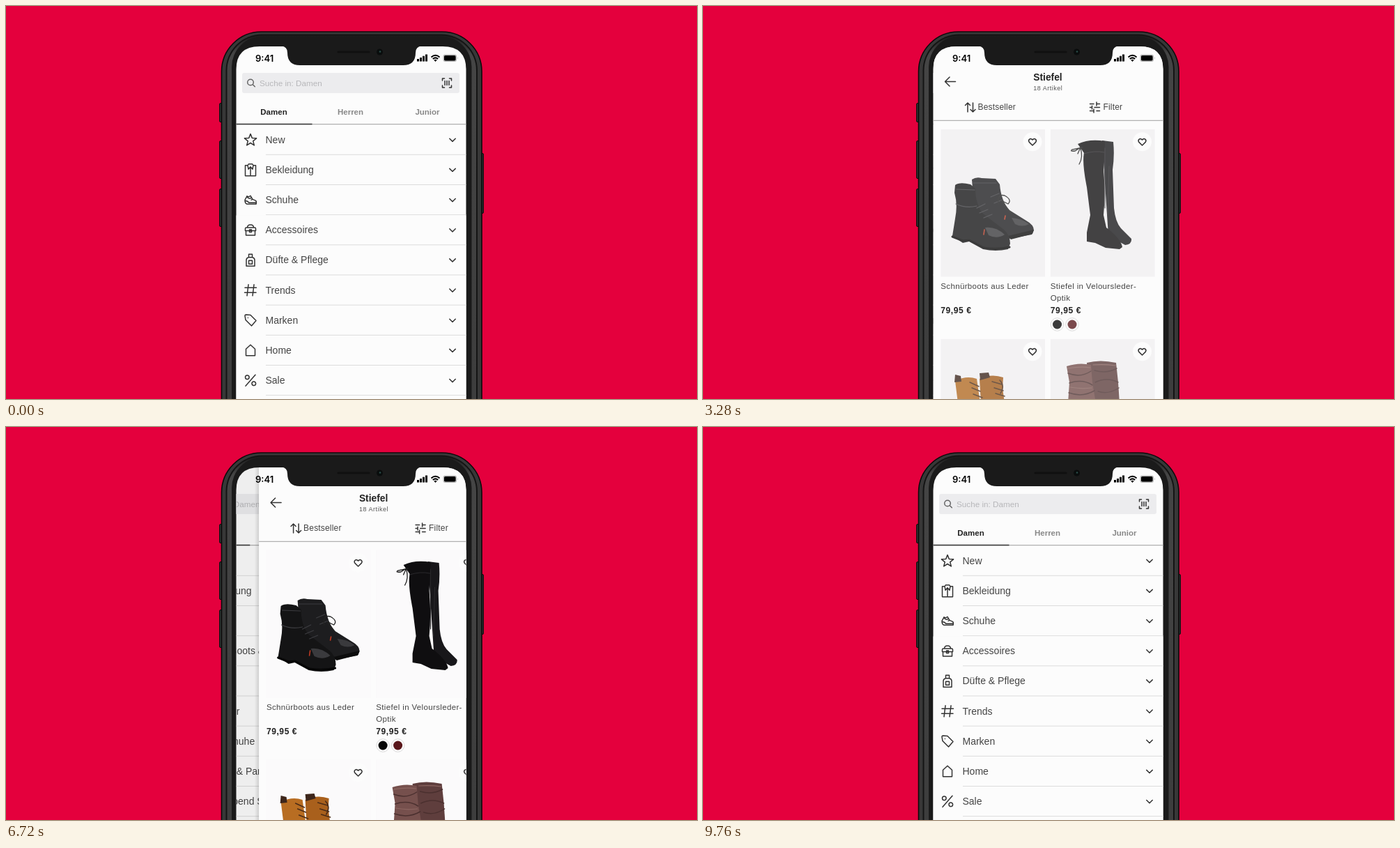
These frames come from a looping animation (992 px wide and 564 px high, 9.84 s). An HTML page:

```html
<!DOCTYPE html>
<html lang="de">
<head>
<meta charset="utf-8">
<title>Shop-App</title>
<style>
html, body { margin: 0; width: 100%; height: 100%; overflow: hidden; background: #e4003d; }
svg { display: block; width: 992px; height: 564px; font-family: "Liberation Sans", Arial, sans-serif; }
.line { fill: none; stroke: #333; stroke-width: 1.5; stroke-linejoin: round; stroke-linecap: round; }
.row { font-size: 14px; fill: #444; }
.tab { font: bold 11.5px "Liberation Sans", Arial, sans-serif; text-anchor: middle; fill: #888; }
.tool { font-size: 12px; letter-spacing: .18px; fill: #444; }
.name { font-size: 11.5px; letter-spacing: .35px; fill: #444; }
.price { font-size: 12px; font-weight: bold; letter-spacing: .6px; fill: #222; }
</style>
</head>
<body>
<svg viewBox="0 0 992 564">
  <defs>
    <clipPath id="glass"><path d="M330.500 564V91Q330.500 58 364 58H627Q660.500 58 660.500 91V564z"/></clipPath>
    <linearGradient id="edge"><stop offset="0" stop-opacity="0"/><stop offset="1" stop-opacity=".14"/></linearGradient>
    <linearGradient id="rim" x2="0" y2="1"><stop offset="0" stop-color="#1c1c1c"/><stop offset=".04" stop-color="#454545"/><stop offset="1" stop-color="#3b3b3b"/></linearGradient>
  </defs>
  <rect width="992" height="564" fill="#e4003d"/>
  <g fill="#303030" stroke="#0c0c0c">
    <rect x="306.500" y="139.500" width="6" height="27" rx="1.500"/>
    <rect x="306.500" y="193.500" width="6" height="54" rx="1.500"/>
    <rect x="306.500" y="262.500" width="6" height="54" rx="1.500"/>
    <rect x="680" y="211.500" width="5.500" height="86" rx="1.500"/>
  </g>
  <rect x="309.500" y="37" width="373.500" height="640" rx="57" fill="#383838" stroke="#0b0b0b" stroke-width="1.600"/>
  <rect x="315.500" y="40.500" width="361.500" height="640" rx="52" fill="#141414"/>
  <rect x="317.500" y="42.500" width="357.500" height="640" rx="50" fill="url(#rim)"/>
  <rect x="324" y="43.500" width="344.500" height="640" rx="44" fill="#1a1a1a"/>
  <g clip-path="url(#glass)">
    <rect x="330" y="57" width="331" height="508" fill="#fcfcfc"/>
    <g id="menu"></g>
    <rect id="dim" x="330" y="57" width="331" height="508"/>
    <g id="shop"></g>
    <text x="358" y="79.500" font-size="13" font-weight="600" style="font-family:Inter,sans-serif">9:41</text>
    <path d="M590 76h3v3.500h-3zM594 74h3v5.500h-3zM598 71.800h3v7.700h-3zM602 69.500h3v10h-3z"/>
    <g fill="none" stroke="#000" stroke-width="2"><path d="M610.500 73.500q6-5.500 12 0M612.800 76q3.700-3.200 7.400 0"/></g>
    <path d="M616.500 80l-2.200-2.400q2.200-1.700 4.400 0z"/>
    <rect x="627.500" y="69.500" width="19.500" height="10.500" rx="3" fill="#bbb"/>
    <rect x="629" y="71" width="16.500" height="7.500" rx="1.800"/>
    <path d="M648 73q1.500 1.700 0 3.500z" fill="#aaa"/>
  </g>
  <path d="M395 57.500Q404 58 404 67Q404 85 422 85H570Q588 85 588 67Q588 58 597 57.500z" fill="#1a1a1a"/>
  <path d="M477 66H521" stroke="#101010" stroke-width="3" stroke-linecap="round"/>
  <circle cx="536.500" cy="66" r="4.500" fill="#0a0d0d"/>
  <circle cx="537" cy="65.500" r="1.300" fill="#2a4d48"/>
</svg>
<script>
const LOOP = 9840, STEP = 80, PITCH = 43.17, WIDTH = 330, SUB_HEIGHT = PITCH * 8;
const $ = id => document.getElementById(id);
const rowY = i => 192 + PITCH * i;
const line = (d, x = 0, y = 0, more = '') => `<path class="line" d="${d}" transform="translate(${x} ${y})" ${more}/>`;
const text = (cls, x, y, s, more = '') => `<text class="${cls}" x="${x}" y="${y}" ${more}>${s}</text>`;
const shape = (fill, d) => `<path fill="${fill}" d="${d}"/>`;
const stroke = (color, width, d) => `<path fill="none" stroke="${color}" stroke-width="${width}" stroke-linecap="round" d="${d}"/>`;

const star = 'M' + Array.from({ length: 10 }, (_, i) => {
  const a = Math.PI * (i / 5 - .5), r = i % 2 ? 3.9 : 9;
  return `${(r * Math.cos(a)).toFixed(1)} ${(r * Math.sin(a) + .6).toFixed(1)}`;
}).join('L') + 'z';

const categories = [
  ['New', star],
  ['Bekleidung', 'M-4-6.500H-7.500V8.500H7.500V-6.500H4M-4-6.500L-2.500-8.500H2.500L4-6.500L3-1L0-4.500L-3-1zM0-4.500V8.500'],
  ['Schuhe', 'M-8 0L-5-5.500L-2.500-4.500L0-6L3-1L7.500 1Q9 2.500 8 6H-5Q-8 5.500-8 0zM-8 1Q-4 1.500-2 4H8M-1-2L1-3M1 0L3-1M-5-5.500Q-4-2-1-2'],
  ['Accessoires', 'M-4.500-3.500Q-4.500-7.500 0-7.500T4.500-3.500M-6-3.500H6Q7.500-3.500 7.500-2V1H-7.500V-2Q-7.500-3.500-6-3.500zM-6.500 1V7.500H6.500V1M-1.500-.5H1.500V3H-1.500z'],
  ['Düfte &amp; Pflege', 'M-2.500-4V-8.500H2.500V-4M-3-4H3Q6-3 6 0V8.500H-6V0Q-6-3-3-4zM-2.500 .5H2.500V5.500H-2.500z'],
  ['Trends', 'M-3-8L-5 8M5-8L3 8M-8-3.500H8.500M-8.500 3.500H8'],
  ['Marken', 'M-8-6.500Q-8-8-6.500-8L0-7.500L8 0.500L1.500 8L-7-.5zM-3.600-3.500v.1'],
  ['Home', 'M-6.500 7.500V-2L0-8L6.500-2V7.500z'],
  ['Sale', 'M7-8L-7 8M-7.500-4.500a2.800 2.800 0 1 0 5.600 0a2.800 2.800 0 1 0-5.600 0M2 4.500a2.800 2.800 0 1 0 5.600 0a2.800 2.800 0 1 0-5.600 0'],
];
const shoeTypes = ['Ankle Boots &amp; Stiefeletten', 'Stiefel', 'Sneaker', 'Halbschuhe', 'Pumps &amp; Party-Schuhe', 'Linie Abend Schuhe'];

const row = (i, label) => text('row', 372.5, rowY(i) + 4.8, label) +
  `<path d="M373 ${rowY(i) + 21.3}H661" stroke="#dcdcdc"/>`;
const category = ([label, icon], i) => row(i, label) + line(icon, 351, rowY(i)) +
  `<g transform="translate(641 ${rowY(i) + .3})"><path class="line" ${i === 2 ? 'id="toggle"' : ''} d="M-4.200-2.100L0 2.100L4.200-2.100"/></g>`;
const rows = categories.map(category);

$('menu').innerHTML = `
  <rect x="339" y="96" width="312" height="29" rx="3" fill="#ececee"/>
  <circle class="line" cx="351" cy="109.500" r="4.300" style="stroke:#666"/>
  ${line('M354.300 112.800L357.300 115.800', 0, 0, 'style="stroke:#666"')}
  ${text('', 364, 114.5, 'Suche in: Damen', 'font-size="11.700" fill="#b7b7ba"')}
  ${line('M-6.500-3.500V-6.500H-3.500M3.500-6.500H6.500V-3.500M6.500 3.500V6.500H3.500M-3.500 6.500H-6.500V3.500M-3-3V3M0-3V3M3-3V3', 633, 110.5)}
  ${text('tab', 384.5, 155.5, 'Damen', 'style="fill:#222"')}
  ${text('tab', 494.5, 155.5, 'Herren')}${text('tab', 605, 155.5, 'Junior')}
  <path d="M330 169.700H661" stroke="#b0b0b0" stroke-width="1.200"/>
  <path d="M330 169.500H439.500" stroke="#333" stroke-width="1.700"/>
  ${rows.slice(0, 3).join('')}
  ${shoeTypes.map((s, i) => row(i + 3, s) + line('M-2-4L2 0L-2 4', 641.5, rowY(i + 3))).join('')}
  <g id="rest"><rect x="330" y="300.500" width="331" height="300" fill="#fcfcfc"/>${rows.slice(3).join('')}</g>`;

const ankleBoots =
  shape('#1d1d1f', 'M386 249Q392 245 400 247L420 248L426 256Q428 280 440 293L464 308Q475 314 475 322L472 328L440 334Q425 330 415 320L390 300z') +
  shape('#0c0c0c', 'M438 330L475 321L473 327L442 335z') +
  shape('#141415', 'M362 257Q368 252 384 256L391 262Q391 285 402 298L432 321Q441 329 441 341L438 349Q420 353 402 349L382 338L373 340L358 330L362 305Q366 285 361 268z') +
  shape('#3a3a3d', 'M405 318Q420 316 433 328Q422 335 410 329zM443 304Q458 305 468 313Q458 318 448 313z') +
  stroke('#050505', 3, 'M358 331L373 337L382 336L403 347Q422 350 440 346') +
  stroke('#3c3c40', 1.2, 'M388 254H421M364 263L390 264M363 284Q378 291 393 287M393 290L405 284M397 297L409 292M403 304L415 299M413 274L425 269M418 283L430 278') +
  stroke('#222', 1.3, 'M424 284Q422 269 433 272Q444 278 438 284L428 279L442 297') +
  stroke('#c23a22', 1.6, 'M404 321L403 328M434 301L433 306');
const tallBoots =
  shape('#18171a', 'M573 193L589 195Q591 215 588 235L590 290Q592 310 600 319L615 334Q616 342 606 343L582 330z') +
  shape('#0f0e10', 'M538 198Q555 190 577 194L575 235Q578 270 575 300L579 318Q600 334 602 346L598 349L578 347L563 340L551 338L551 325L556 300L551 260Q544 225 547 211z') +
  stroke('#2a292c', 1, 'M547 212Q562 207 576 210M577 204V290M583 230L581 300') +
  stroke('#1a1a1a', 1.3, 'M545 203L530 206Q526 209 534 208L542 203L538 212M542 204Q546 217 540 227');
const tanBoots =
  shape('#a9601c', 'M397 535Q414 527 431 533L430 548L433 570H399z') +
  shape('#b86d22', 'M362 538Q378 530 393 535L398 570H366z') +
  shape('#3d261b', 'M362 529L370 531L371 539L361 540zM397 527L410 526L412 533L398 537z') +
  stroke('#4a2b17', 1.5, 'M383 540L396 546M386 548L398 553M388 557L401 562M415 539L429 543M418 548L431 552M420 556L433 560M426 537Q434 545 427 556');
const slouchBoots =
  shape('#5f3e3d', 'M551 512Q570 507 593 512L596 540L598 570H555z') +
  shape('#76504d', 'M522 517Q540 511 557 515L559 540L564 570H524L526 540z') +
  stroke('#4b302f', 1.5, 'M524 527Q542 534 557 524M526 541Q545 535 559 544M525 555Q545 562 562 552M562 523Q580 528 594 520M563 540Q580 532 596 540M567 553Q582 558 597 548') +
  stroke('#8d6661', 1.2, 'M524 520Q542 517 556 519M527 547Q543 550 558 548M560 515Q578 514 592 516');

const tiles = [[341.5, 177], [499, 177], [341.5, 478], [499, 478]];
const heart = 'M0 5L-4.700 .4C-7-3-2.500-6.500 0-2.800C2.500-6.500 7-3 4.700 .4z';
const swatch = (x, fill) => `<circle cx="${x}" cy="457" r="6.500" fill="${fill}"/>`;

$('shop').innerHTML = `
  <rect x="324" y="57" width="7" height="508" fill="url(#edge)"/>
  <rect x="330.500" y="57" width="331" height="508" fill="#fcfcfc"/>
  ${line('M362.500 108.500H348M354 102L347.500 108.500L354 115')}
  ${text('', 495, 107, 'Stiefel', 'font-size="13.800" font-weight="bold" text-anchor="middle" fill="#222"')}
  ${text('', 495.3, 121.3, '18 Artikel', 'font-size="9" letter-spacing=".5" text-anchor="middle" fill="#555"')}
  ${line('M380 152V139M376.500 142.500L380 139L383.500 142.500M387.500 139V152M384 148.500L387.500 152L391 148.500')}
  ${text('tool', 394.5, 149.3, 'Bestseller')}
  ${line('M555.500 140.500H561M565 140.500H569.500M565 138V143M555.500 145.500H558.500M562 145.500H569.500M558.500 143.200V148M555.500 150.500H561M565 150.500H569.500M561 148V153')}
  ${text('tool', 574.5, 149.3, 'Filter')}
  <path d="M330.500 164.300H661" stroke="#b0b0b0" stroke-width="1.300"/>
  ${tiles.map(([x, y]) => `<rect x="${x}" y="${y}" width="149.500" height="211.500" fill="#dcdbdd"/>`).join('')}
  ${swatch(508.5, '#dcdbdd')}${swatch(530, '#dcdbdd')}
  <g id="photos">
    ${tiles.map(([x, y]) => `<rect x="${x - .5}" y="${y - .5}" width="150.500" height="212.500" fill="#fbfafb"/>`).join('')}
    ${ankleBoots}${tallBoots}${tanBoots}${slouchBoots}
    ${swatch(508.5, '#050505')}${swatch(530, '#5a171b')}
  </g>
  <g fill="none" stroke="#ddd"><circle cx="508.500" cy="457" r="9.300"/><circle cx="530" cy="457" r="9.300"/></g>
  ${tiles.map(([x, y]) => `<circle cx="${x + 131.5}" cy="${y + 17.7}" r="13.500" fill="#fcfcfc"/>` + line(heart, x + 131.5, y + 18)).join('')}
  ${text('name', 341.3, 406.3, 'Schnürboots aus Leder')}
  ${text('name', 498.7, 406.3, 'Stiefel in Veloursleder-')}${text('name', 498.7, 423.3, 'Optik')}
  ${text('price', 341.3, 441.3, '79,95 €')}${text('price', 498.7, 441.3, '79,95 €')}`;

const ease = u => u < .5 ? 4 * u ** 3 : 1 - (2 - 2 * u) ** 3 / 2;
const ramp = (t, start, length) => ease(Math.min(1, Math.max(0, (t - start) / length)));
const shift = (id, x, y = 0) => $(id).setAttribute('transform', `translate(${x} ${y})`);

function draw(now) {
  const t = Math.floor(now % LOOP / STEP) * STEP;
  const open = ramp(t, 1040, 480) - ramp(t, 8960, 480);
  const shown = ramp(t, 2160, 480) - ramp(t, 6560, 550);
  shift('rest', 0, SUB_HEIGHT * open);
  $('toggle').setAttribute('transform', `scale(1 ${1 - 2 * open})`);
  shift('menu', -.3 * WIDTH * shown);
  $('dim').setAttribute('opacity', .06 * shown);
  shift('shop', (WIDTH + 10) * (1 - shown) - 10 * (1 - shown) * shown);
  $('photos').setAttribute('opacity', ramp(t, 3040, 400));
}

const begin = performance.now();
(function tick() {
  draw(performance.now() - begin);
  requestAnimationFrame(tick);
})();
</script>
</body>
</html>
```
